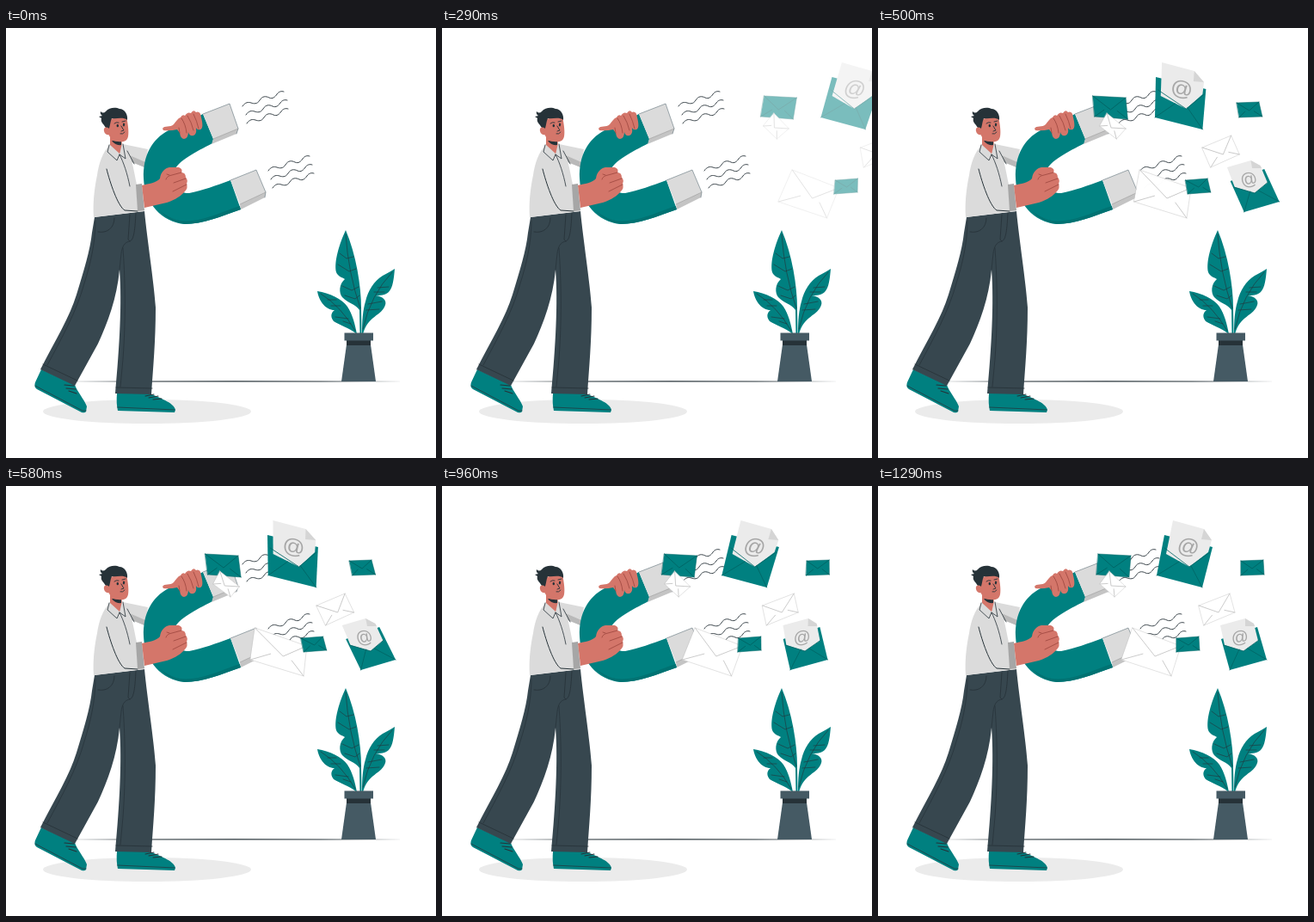
An HTML page with a canvas that plays this animation: 500x500 px, repeating every 1.33 s.

```html
<!DOCTYPE html>
<html lang="en">
<head>
<meta charset="utf-8">
<title>Mail magnet</title>
<style>
  html, body { margin: 0; width: 100%; height: 100%; overflow: hidden; background: #fff; }
  canvas { display: block; width: 100vw; height: 100vh; }
</style>
</head>
<body>
<canvas id="stage" width="500" height="500"></canvas>
<script>
const TEAL = '#008080', DEEP = '#006464', INK = '#263238', SLATE = '#37474f', POT = '#455a64';
const SKIN = '#d4766a', SKIN_LINE = '#9c463e', CLOTH = '#dbdbdb', GREY = '#a6a6a6', PAPER = '#ebebeb';

const newLayer = () => Object.assign(document.createElement('canvas'), { width: 500, height: 500 }).getContext('2d');
const stage = document.getElementById('stage').getContext('2d');
const scene = newLayer();
const mail = newLayer();

function fill(g, color, d) {
  g.fillStyle = color;
  g.fill(new Path2D(d));
}

function line(g, color, d, width = 0.8) {
  g.strokeStyle = color;
  g.lineWidth = width;
  g.lineCap = g.lineJoin = 'round';
  g.stroke(new Path2D(d));
}

function drawFloor(g) {
  g.fillStyle = PAPER;
  g.beginPath();
  g.ellipse(164, 446, 121, 14, 0, 0, Math.PI * 2);
  g.fill();
  fill(g, INK, 'M70 411Q265 409.6 463 411Q265 412 70 411Z');
}

function drawPlant(g) {
  fill(g, TEAL, 'M395 235C388 250 381 272 384 284C386 289 391 290 394 292C387 298 387 308 391 313C397 320 407 321 411 328L411.5 356H413.5L413 326C413 300 407 263 395 235Z');
  fill(g, TEAL, 'M362 306C376 308 391 315 397 324C403 333 406 345 408 356C400 349 387 345 381 341C376 335 379 330 382 328C372 328 364 318 362 306Z');
  fill(g, TEAL, 'M452 280C451 291 450 302 445 307C441 311 435 311 430 311C438 312 443 317 441 322C437 335 421 334 415 356H414C414 340 415 328 418 318C421 305 428 294 438 288C443 285 448 283 452 280Z');
  line(g, INK, 'M395 240Q398 285 412 326M388 262L396 268L404 266M386 275L399 283L407 280M391 300L402 305L410 301M394 311L406 315L411 311', 0.6);
  line(g, INK, 'M366 309Q390 324 406 352M374 316L384 316M378 323L389 323M383 336L398 338M392 341L401 344', 0.6);
  line(g, INK, 'M449 284Q424 310 415 350M432 302L445 301M428 307L440 307M421 321L437 318M419 328L434 327', 0.6);
  fill(g, POT, 'M396 368H424L430 411H390Z');
  fill(g, INK, 'M396 363H424V369H396Z');
  fill(g, POT, 'M393.5 354.5H427V363.5H393.5Z');
}

function drawLegs(g) {
  fill(g, TEAL, 'M41 397L80 415C83 423 91 432 94 440L93 446Q92 448 88 447L36 420Q32 417 34 412Z');
  line(g, INK, 'M34 416L89 445L93 445', 0.7);
  fill(g, TEAL, 'M129 425H168C177 430 195 435 197 444L196 447L130 445Q128 436 129 425Z');
  line(g, INK, 'M129.5 441L196 444', 0.7);
  line(g, INK, 'M68 415L79 416M70 419L81 420M73 422L82 425M162 428L172 426M166 430L177 428M171 432L181 431', 1.1);
  fill(g, SLATE, 'M103 220L161 213C164 245 172 295 174 325C174 365 171 395 169 426L127 425C132 370 135 320 132 281C129 314 118 343 107 367L80 416L40 397C58 362 74 336 82 310C90 284 98 258 100 238Z');
  line(g, INK, 'M43 391L83 410M128 418L170 419M126 221C126 233 117 239 107 237M151 215C150 234 149 246 144 248L142 246L144 217');
  line(g, INK, 'M144 248C137 249 135 255 134 262L132 281M136 256C138 285 140 330 136 385L133 417M104 224C104 250 98 275 91 297C82 330 65 360 48 392', 0.7);
}

function drawTorso(g) {
  fill(g, CLOTH, 'M136 135L165 141L161 162L140 152Z');
  fill(g, '#b9b9b9', 'M139 146L162 156L161 162L141 154Z');
  fill(g, CLOTH, 'M121 136C112 144 108 158 106 171C102 190 101 207 102 220L161 213L152 182C149 168 146 148 140 137Z');
  fill(g, SKIN, 'M121 119L134 125L135 137Q134 146 131 147Q125 143 121 137Z');
  fill(g, INK, 'M123 131L134 132L134 136Q127 137 123 131Z');
  fill(g, CLOTH, 'M120 135L117 144L130 154L132 146ZM135 134L140 149L132 147Z');
  line(g, INK, 'M120 136L118 144L129 154L132 147L139 152L136 135M132 147C137 157 141 169 144 184M141 143L149 158');
  line(g, INK, 'M117 164C121 180 130 207 138 212L153 213', 1);
  fill(g, GREY, 'M151 182L158 181L161 212L153 213Z');
}

function drawHead(g) {
  fill(g, SKIN, 'M119 106L140 103C142 112 143 121 142 126C141 132 136 133 130 132C124 132 120 127 119 122Z');
  fill(g, INK, 'M108 103L112 102Q109 100 110 97Q113 100 116 97C120 92 128 92 132 94C138 94 142 101 141 107C136 103 129 106 123 105C121 109 121 116 119 119C117 117 115 115 114 113C111 110 110 107 111 105Z');
  fill(g, SKIN, 'M120 117C116 114 113 116 114 120C115 124 118 125 121 124Z');
  fill(g, INK, 'M128.6 113.2A1.2 1.6 0 1 0 131 114A1.2 1.6 0 1 0 128.6 113.2ZM136 112A1.1 1.5 0 1 0 138 113A1.1 1.5 0 1 0 136 112Z');
  line(g, INK, 'M126 111Q128 109 131 110M135 109L139 108M133 123Q136 124 138 121M134 114L137 119L134 120', 0.9);
}

function drawMagnet(g) {
  fill(g, TEAL, 'M229 100C216 107 201 112 189 119C170 129 159 148 160 175C161 203 181 226 208 228C229 228 250 219 273 211L261 177C245 183 228 189 213 192C201 193 191 181 195 167C200 154 221 144 240 134L241 129Z');
  fill(g, '#007272', 'M177 211C190 222 203 226 216 224C236 222 255 212 272 207L273 211C250 219 229 228 208 228Q190 226 177 211Z');
  fill(g, CLOTH, 'M229 100L260 88L270 117L241 129ZM261 177L291 165L302 191L272 205Z');
  fill(g, '#c4c4c4', 'M241 129L270 117L268 123L239 135ZM272 205L302 191L301 197L273 211Z');
  line(g, POT, 'M229 100L260 88L270 117L268 123M261 177L291 165L302 191L301 197', 0.5);
  line(g, '#888', 'M241 129L270 117M272 205L302 191', 0.5);
}

function drawHands(g) {
  fill(g, SKIN, 'M182 117C184 113 191 116 195 112C198 108 200 105 203 104Q205 100 208 102Q211 97 215 99Q218 94 221 98Q226 96 227 104C229 112 229 117 226 118Q222 119 221 116Q222 124 218 125Q213 126 212 121Q212 128 207 129Q203 129 202 122L199 118Q191 120 183 119Z');
  line(g, SKIN_LINE, 'M204 105Q209 112 210 122M211 102Q216 110 218 119M218 100Q222 108 224 117M202 122L201 116');
  fill(g, SKIN, 'M158 183C166 181 175 180 179 175C180 167 185 163 190 162L201 162Q206 164 204 168Q209 168 209 174Q212 177 210 181Q212 186 208 190C201 198 193 201 187 203L161 209Z');
  line(g, SKIN_LINE, 'M204 168L193 171Q187 172 186 176M209 175L195 180M210 182L194 190M190 171L187 170');
}

function drawWaves(g) {
  const starts = [[275, 91], [279, 101], [280, 111], [305, 166], [308, 176], [310, 186]];
  for (const [x, y] of starts) {
    line(g, INK, `M${x} ${y}c3-5 7-5 10-4s7 2 10-3s7-5 11-3s7-1 9-4s5-4 8-3`, 0.9);
  }
}

// Corners run clockwise; the flap meets at the given point.
function envelope(g, corners, [fx, fy], color, edge) {
  const [a, b, c, d] = corners;
  const toFlap = ([x, y], [tx, ty]) => `M${x} ${y}L${x + (fx - x) * 0.72 + (tx - fx) * 0.12} ${y + (fy - y) * 0.72 + (ty - fy) * 0.12}`;
  const outline = `M${a}L${b}L${c}L${d}Z`;
  fill(g, color, outline);
  line(g, edge, `M${a}L${fx} ${fy}L${b}${toFlap(d, a)}${toFlap(c, b)}`, 0.9);
  line(g, edge, outline, 0.5);
}

function atSign(g, x, y, size, degrees) {
  g.save();
  g.translate(x, y);
  g.rotate(degrees * Math.PI / 180);
  g.font = `${size}px "Liberation Sans", Arial, sans-serif`;
  g.textAlign = 'center';
  g.textBaseline = 'alphabetic';
  g.fillStyle = GREY;
  g.fillText('@', 0, size * 0.27);
  g.restore();
}

function drawMail(g) {
  fill(g, TEAL, 'M333 57L389 71L377 118L324 104Z');
  fill(g, PAPER, 'M343 40L379 50L388 63L384 77L362 94L335 79Z');
  fill(g, '#d5d5d5', 'M379 50L376 62L388 63Z');
  line(g, DEEP, 'M324 104L350 88M377 118L364 93M333 72L362 94L386 77', 0.8);
  atSign(g, 360.5, 72, 25, 12);

  fill(g, TEAL, 'M399 178L441 164L452 202L409 214Z');
  fill(g, PAPER, 'M398 162L427 154L437 160L442 180L425 192L403 185Z');
  fill(g, '#d5d5d5', 'M427 154L427 163L438 163L437 160Z');
  line(g, DEEP, 'M409 214L420 190M452 202L430 189M402 185L425 192L443 179', 0.8);
  atSign(g, 421, 177, 20, -9);

  envelope(g, [[422, 87], [448, 86], [449, 103], [422, 104]], [435, 96], TEAL, DEEP);
  envelope(g, [[256, 79], [294, 81], [292, 106], [254, 103]], [274, 95], TEAL, DEEP);
  envelope(g, [[269, 99], [288, 117], [275, 129], [258, 114]], [271, 116], '#fff', '#c6c6c6');
  envelope(g, [[373, 139], [409, 125], [415, 147], [379, 162]], [396, 147], '#fff', '#c6c6c6');
  envelope(g, [[296, 165], [352, 186], [341, 221], [283, 202]], [322, 198], '#fff', '#c6c6c6');
  envelope(g, [[347, 177], [373, 175], [374, 191], [347, 193]], [361, 185], TEAL, DEEP);
}

// Cubic Bezier easing (.36, -.01, .5, 1.38), solved for x by bisection.
function ease(x) {
  const curve = (s, p, q) => 3 * (1 - s) ** 2 * s * p + 3 * (1 - s) * s * s * q + s ** 3;
  let low = 0, high = 1;
  for (let i = 0; i < 24; i++) {
    const mid = (low + high) / 2;
    if (curve(mid, 0.36, 0.5) < x) low = mid; else high = mid;
  }
  return curve(low, -0.01, 1.38);
}

const KEYS = [
  { at: 0, shift: 236, skew: -20, alpha: 0 },
  { at: 0.6, shift: 0, skew: 10, alpha: 1 },
  { at: 0.8, shift: 0, skew: -2, alpha: 1 },
  { at: 1, shift: 0, skew: 0, alpha: 1 }
];

function pose(progress) {
  const p = Math.min(progress, 1);
  const next = KEYS.findIndex((key, i) => i > 0 && p <= key.at);
  const a = KEYS[next - 1], b = KEYS[next];
  const e = ease((p - a.at) / (b.at - a.at));
  const mix = (u, v) => u + (v - u) * e;
  const slope = key => Math.tan(key.skew * Math.PI / 180);
  return {
    shift: mix(a.shift, b.shift),
    slope: mix(slope(a), slope(b)),
    alpha: Math.max(0, Math.min(1, mix(a.alpha, b.alpha)))
  };
}

const LOOP = 1330, STEP = 1000 / 24, PIVOT_Y = 131;

function render(time) {
  const step = Math.floor((time % LOOP + 5) / STEP);
  stage.drawImage(scene.canvas, 0, 0);
  if (step >= 3) {
    const { shift, slope, alpha } = pose(step / 30 + 0.001);
    mail.setTransform(1, 0, 0, 1, 0, 0);
    mail.clearRect(0, 0, 500, 500);
    mail.setTransform(1, 0, slope, 1, shift - slope * PIVOT_Y, 0);
    drawMail(mail);
    stage.globalAlpha = alpha;
    stage.drawImage(mail.canvas, 0, 0);
    stage.globalAlpha = 1;
  }
}

fill(scene, '#fff', 'M0 0H500V500H0Z');
for (const part of [drawFloor, drawPlant, drawLegs, drawTorso, drawHead, drawMagnet, drawHands, drawWaves]) part(scene);

const start = performance.now();
function tick() {
  render(performance.now() - start);
  requestAnimationFrame(tick);
}
tick();
</script>
</body>
</html>
```
